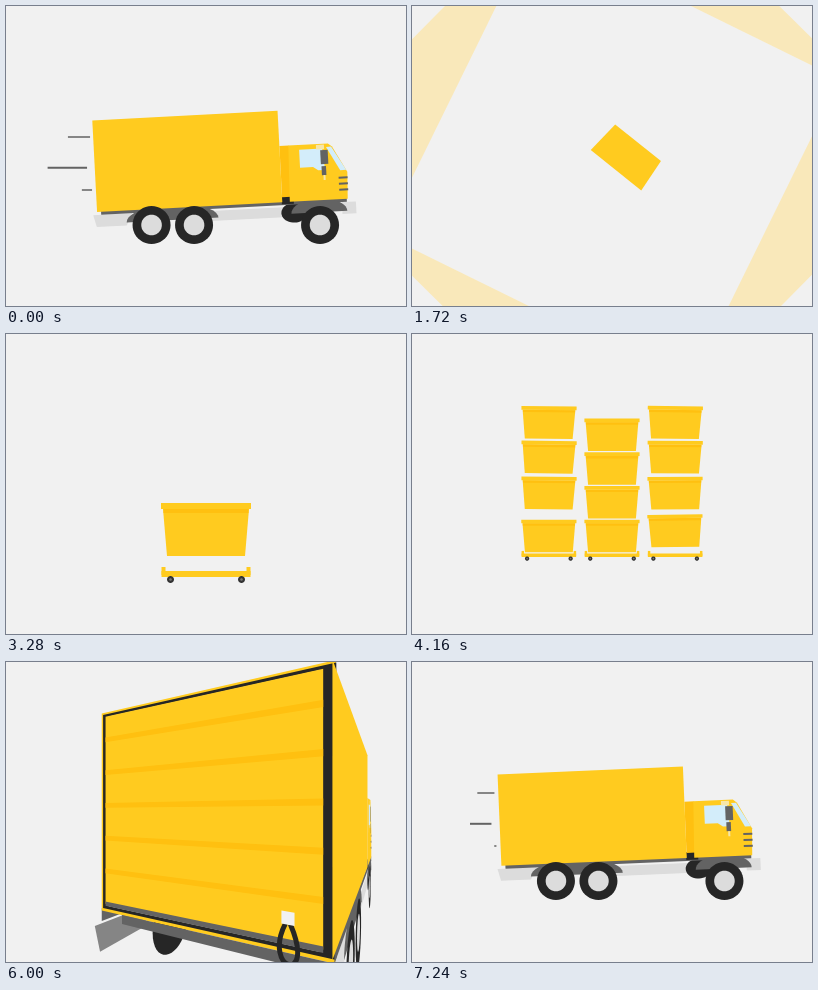
An HTML page with a canvas for the animation above (7.28 s loop, 400 by 300 pixels).

```html
<!DOCTYPE html>
<html>
<head>
<meta charset="utf-8">
<style>
html, body { margin: 0; width: 100%; height: 100%; overflow: hidden; background: #f1f1f1; }
canvas { display: block; }
</style>
</head>
<body>
<canvas id="c" width="400" height="300"></canvas>
<script>
const ctx = document.getElementById('c').getContext('2d');
const LOOP = 7280, FOCAL = 312, RAD = Math.PI / 180;
const BG = '#f1f1f1', YELLOW = '#ffcb1f', AMBER = '#ffc010', BLACK = '#262626',
  GREY = '#636363', LIGHT = '#dcdcdc', GLASS = '#d3edfa', CREAM = '#f7e6a8';

const clamp = x => Math.max(0, Math.min(1, x));
const ramp = (t, a, b) => clamp((t - a) / (b - a));
const inOut = q => q < .5 ? 2 * q * q : 1 - 2 * (1 - q) ** 2;
const out = q => 1 - (1 - q) ** 2;
const hop = (t, a, b) => Math.sin(Math.PI * ramp(t, a, b));
const same = (x, y) => [x, y];

// Flat list of coordinates, optionally mapped to the stage
function path(pts, map = same) {
  ctx.beginPath();
  for (let i = 0; i < pts.length; i += 2) ctx.lineTo(...map(pts[i], pts[i + 1]));
  ctx.closePath();
}
function poly(color, pts, map) {
  path(pts, map);
  ctx.fillStyle = color;
  ctx.fill();
}
function rect(color, x, y, w, h, map) {
  poly(color, [x, y, x + w, y, x + w, y + h, x, y + h], map);
}
function oval(color, x, y, rx, ry, map, from = 0, to = 360) {
  const pts = [];
  for (let a = from; a <= to; a += 9) pts.push(x + rx * Math.cos(a * RAD), y + ry * Math.sin(a * RAD));
  poly(color, pts, map);
}
const disc = (color, x, y, r, map) => oval(color, x, y, r, r, map);

// ---- opening burst ----
function square(size, deg) {
  ctx.save();
  ctx.rotate(deg * RAD);
  ctx.rect(-size / 2, -size / 2, size, size);
  ctx.restore();
}
function burst(t) {
  const outer = 1 - (1 - ramp(t, 1280, 1980)) ** 3, inner = out(ramp(t, 1400, 2100));
  const q = ramp(t, 1270, 1900);
  ctx.save();
  ctx.translate(200, 151);
  ctx.globalAlpha = 1 - q ** 3;
  ctx.beginPath();
  square(474 * outer, 47 * outer);
  square(482 * inner, 37 * inner);
  ctx.fillStyle = `rgb(255, ${203 + 35 * q}, ${31 + 175 * q})`;
  ctx.fill('evenodd');
  ctx.restore();
}

// ---- bins, placed by the middle of their base ----
function bin(x, y, deg = 0, scale = 1, rim = 1) {
  ctx.save();
  ctx.translate(x, y - 23.5);
  ctx.rotate(deg * RAD);
  ctx.scale(scale, scale);
  ctx.translate(0, 23.5);
  poly(YELLOW, [-43, -47, 43, -47, 39, 0, -39, 0]);
  if (rim) {
    rect(AMBER, -42.5, -47, 85, 4 * rim);
    rect(YELLOW, -45, -47 - 6 * rim, 90, 6 * rim);
  }
  ctx.restore();
}
function dolly(x, scale) {
  if (!scale) return;
  ctx.save();
  ctx.translate(x, 240);
  ctx.scale(scale, scale);
  rect(YELLOW, -44.5, -3, 89, 6);
  for (const side of [-1, 1]) {
    rect(YELLOW, side * 42.5 - 2, -7, 4, 8);
    disc('#333', side * 35.5, 5.5, 3.5);
    disc('#777', side * 35.5, 5.5, 1.3);
  }
  ctx.restore();
}
function heroBin(t) {
  if (t < 2040) {
    const e = out(ramp(t, 1320, 2040));
    bin(200 + 26 * Math.sin(Math.PI * e), 174, -360 + 720 * e, .2 + .8 * e ** 1.7, ramp(t, 1760, 2040));
    return;
  }
  const fall = ramp(t, 2700, 2960) ** 2;
  const y = 174 + 61 * fall - 60 * hop(t, 2060, 2680) - 9 * hop(t, 2960, 3140) - 13 * hop(t, 3140, 3400);
  bin(200, y, 9 * Math.sin(2 * Math.PI * ramp(t, 2060, 2680)));
}
function bins(t) {
  const far = inOut(ramp(t, 4500, 5440));
  const zoom = 1 - .387 * inOut(ramp(t, 3440, 3760)) - .058 * far;
  const air = hop(t, 4060, 4380) + .35 * hop(t, 4380, 4620);
  const cy = 191.5;
  ctx.save();
  ctx.translate(200, cy - 4 * far);
  ctx.scale(zoom, zoom);
  ctx.translate(-200, -cy);
  for (let col = 0; col < 3; col++) {
    const x = 97 + 103 * col, side = col != 1;
    dolly(x, side ? out(ramp(t, 3440, 3600)) : out(ramp(t, 2880, 3080)));
    for (let row = 0; row < 4; row++) {
      if (!side && !row) {
        heroBin(t);
        continue;
      }
      // drop in from above, then the outer stacks bounce once more
      const land = 3640 + row * 110 + (side ? 30 + col * 15 : 0);
      const k = Math.max(0, (land - t) / 300);
      if (k > 1.2) continue;
      const lift = side ? Math.max(5 * col, 29 * (1 - 1 / (1 + 1.6 * row))) : 0;
      const lean = side ? Math.sin(.8 * row - .6 * col) : 0;
      bin(x, 235 - row * 55 - 330 * k * k - lift * air, lean * (air + k));
    }
  }
  ctx.restore();
}

// ---- truck ----
// Camera-space centre, turn p (0 = rear, 1 = side) and body lean
function pose(t) {
  if (t < 1000) {
    const f = t / 40;
    return { p: 1, x: -16 + 1.7 * f + 2.45 * f ** 1.6, z: 362, tilt: -3 };
  }
  const p = inOut(ramp(t, 5640, 6520));
  let x = 189 * p * (1 - p), z = 181 + 7 * p + 151 * p * p;
  z -= 43 * (1 - out(ramp(t, 5060, 5440)));
  if (t > 6520) {
    const settle = inOut(ramp(t, 6520, 6960)), f = Math.max(-8, (t - LOOP) / 40);
    x = t < 6960 ? -23.2 * settle : -16 + 1.7 * f + .1 * f * f;
    z = 339 + 23 * settle;
  }
  return { p, x, z, tilt: -3 * ramp(t, 6900, LOOP) ** 2 };
}

// The body is drawn level and leans about the front axle
function sideArt(flat, tilt) {
  const c = Math.cos(tilt * RAD), s = Math.sin(tilt * RAD);
  const body = (x, y) => flat(300 + (x - 300) * c - (y - 200) * s, 200 + (x - 300) * s + (y - 200) * c);
  const block = (color, x0, y0, x1, y1) => rect(color, x0, y0, x1 - x0, y1 - y0, body);
  const shape = (color, ...pts) => poly(color, pts, body);
  shape(LIGHT, 87, 198, 126, 198, 120, 210, 90, 210);
  block(LIGHT, 200, 200, 282, 210);
  block(LIGHT, 336, 198, 350, 210);
  oval(BLACK, 288, 206, 13, 10, body);
  block(GREY, 95, 194, 341, 198);
  oval(GREY, 166, 207, 46, 16, body, 180);
  oval(GREY, 313, 207, 28, 14, body, 180);
  block(BLACK, 276, 189, 288, 197);
  block(AMBER, 276.5, 138.6, 286, 190);
  shape(YELLOW, 285.5, 138.6, 325, 138.6, 329, 142, 343, 168, 342, 195, 284, 195);
  shape(GLASS, 296, 143.5, 319, 143.5, 321, 165, 314, 165, 309, 161.5, 296, 161.5);
  shape(GLASS, 323, 142, 328, 142, 342, 166, 336, 166);
  block(CREAM, 313, 139.5, 321, 144);
  block(GREY, 317, 145, 324.5, 159);
  block(GREY, 317.5, 161, 322, 170);
  block(CREAM, 319, 170, 321, 175);
  for (let i = 0; i < 3; i++) block(GREY, 334, 172.5 + 6 * i, 343, 174.5 + 6 * i);
  block(YELLOW, 91, 103.5, 276.5, 195);
  for (const x of [145.5, 188, 314]) {
    disc(BLACK, x, 219, 19, flat);
    disc(LIGHT, x, 219, 10.3, flat);
  }
}

function rear(t, front, turn) {
  const shut = inOut(ramp(t, 5200, 5680)), b = -44.5 + 87 * shut;
  const left = -47.4 - 1.2 * turn, width = 47.4 - left;
  rect(YELLOW, -51, -46, 102, 92, front);
  rect(BLACK, -50.1, -45.2, 100.2 + turn, 90, front);
  rect(GREY, -38, 46, 89, 4, front);
  rect(BG, -46.4, -44, 92.8, 87.4, front);
  ctx.save();
  path([left, -44.2, 47.4, -44.2, 47.4, 44, left, 44], front);
  ctx.clip();
  if (t < 5720) bins(t);
  rect(YELLOW, left, b - 100, width, 100, front);
  // upper slats spread apart as the door unrolls
  for (let i = 1; i < 6; i++) {
    const d = 15.2 * i - 11 * (1 - shut) * Math.max(0, i - 2);
    rect(AMBER, left, b - d - 1.1, width, 2.2, front);
  }
  rect(GREY, left, b - 1, width, 2, front);
  ctx.restore();
  // pull strap
  const hang = (x, y) => front(36.4 + x, b + y);
  ctx.beginPath();
  ctx.moveTo(...hang(-.8, -6));
  ctx.bezierCurveTo(...hang(-9, 11.6), ...hang(9, 11.6), ...hang(.8, -6));
  ctx.strokeStyle = BLACK;
  ctx.lineWidth = 5;
  ctx.stroke();
  rect(BG, -2.15, -10, 4.3, 4.3, hang);
}

function truck(t) {
  const { p, x, z, tilt } = pose(t), yaw = 90 * p * RAD;
  const s = Math.sin(yaw), c = Math.cos(yaw);
  const at = (w, y, l) => {
    const k = FOCAL / Math.max(5, z - w * s + l * c);
    return [200 + (x + w * c + l * s) * k, 150 + y * k];
  };
  const side = w => (u, v) => at(w, v - 150, u - 184);
  if (p > 0 && p < .75) {
    const left = side(-51);
    disc(BLACK, 145.5, 219, 18, left);
    poly('#858585', [87, 202, 126, 202, 120, 213, 90, 215], left);
    rect(GREY, 91, 195, 59, 6, left);
  }
  if (x * s + z * c > 93) rear(t, (w, y) => at(w, y, -93), 2 * s);
  if (x * c - z * s + 51 < 0) sideArt(side(50), tilt);
}

function speedLines(t) {
  const f = (t > 5000 ? t - LOOP : t) / 40;
  if (f < -3 || f > 25) return;
  const dx = pose(t).x + 16 - Math.max(0, f - 18) * 16;
  const line = (x, y, len, rate, max, h) => {
    const w = Math.max(0, Math.min(max, len + rate * f));
    rect(GREY, x + dx - w, y - h / 2, w, h);
  };
  line(84, 131, 22, 5, 26, 1.5);
  line(81, 161.8, 39, 18, 41, 2);
  line(86, 184, 10, 8, 22, 1.5);
}

function draw(t) {
  ctx.fillStyle = BG;
  ctx.fillRect(0, 0, 400, 300);
  if (t < 1000 || t >= 5080) {
    truck(t);
    speedLines(t);
  } else if (t >= 1280) {
    if (t < 2000) burst(t);
    if (t >= 1340) bins(t);
  }
}

const start = performance.now();
function tick() {
  draw((performance.now() - start) % LOOP);
  requestAnimationFrame(tick);
}
tick();
</script>
</body>
</html>
```
